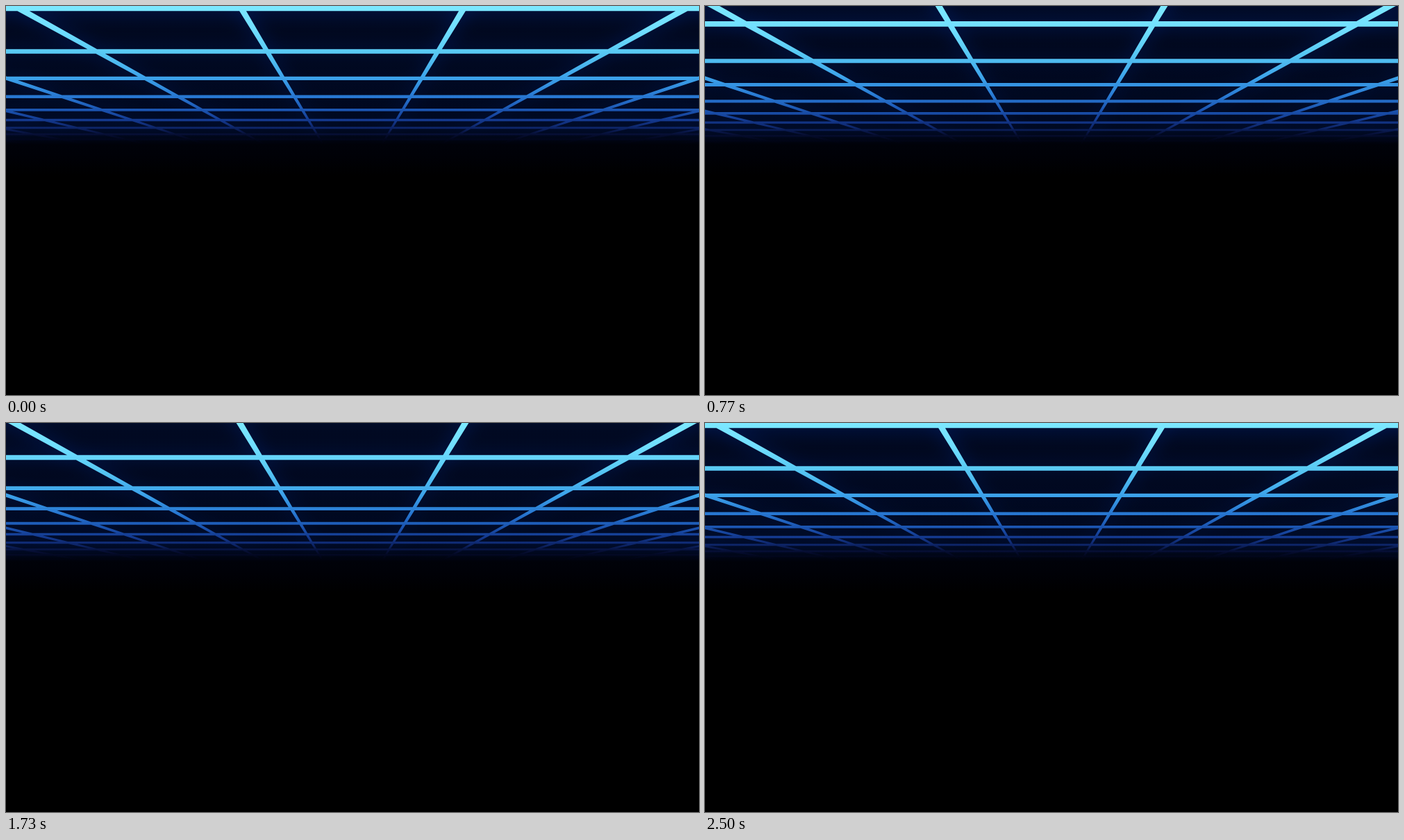
Recreate the animation shown at these times as an HTML page with a canvas. Size 998x561 px, loop 2.53 s.

```html
<!DOCTYPE html>
<html lang="en">
<head>
<meta charset="utf-8">
<title>Neon ceiling grid</title>
<style>
  html, body { margin: 0; width: 100%; height: 100%; overflow: hidden; background: #000; }
  canvas { display: block; }
</style>
</head>
<body>
<canvas id="stage" width="998" height="561"></canvas>
<script>
const ctx = document.getElementById('stage').getContext('2d');
const WIDTH = 998, HEIGHT = 561, CENTER = WIDTH / 2;
const HORIZON = 270;
const LOOP = 2530, STEPS = 75, STEP = 100 / 3;
const SLOPE = 0.6012;       // sideways run of the innermost rail per pixel of height
const THICKNESS = 0.032;    // line weight per pixel of distance from the horizon
const NEAR = 1 / 267, GAP = 0.001146;  // inverse heights of the crossbars

function verticalGradient(stops) {
  const gradient = ctx.createLinearGradient(0, 0, 0, 250);
  for (const [y, color] of stops) gradient.addColorStop(y / 250, color);
  return gradient;
}

const neon = verticalGradient([
  [0, '#7ce8ff'], [35, '#70deff'], [65, '#5acbf4'], [104, '#3ca2ea'],
  [130, '#2878d2'], [150, '#1b54b0'], [164, '#143a90'], [176, '#0d2466'],
  [186, '#080f38b0'], [200, '#00001400']
]);
const haze = verticalGradient([
  [0, '#010a24'], [85, '#010618'], [150, '#00030e'], [215, '#000107'], [245, '#000']
]);

function addRail(path, index) {
  const slope = index * SLOPE, top = -20, reach = HORIZON - top;
  const x = CENTER + slope * reach;
  const half = THICKNESS / 2 * reach * Math.hypot(1, slope);
  path.moveTo(CENTER, HORIZON);
  path.lineTo(x - half, top);
  path.lineTo(x + half, top);
  path.closePath();
}

function addCrossbar(path, depth) {
  const reach = 1 / (NEAR + GAP * depth);
  const weight = THICKNESS * reach;
  path.rect(-50, HORIZON - reach - weight / 2, WIDTH + 100, weight);
}

function draw(time) {
  const step = Math.floor((time % LOOP + 3.4) / STEP);
  const phase = step % STEPS / STEPS;
  const grid = new Path2D();
  for (let i = -15; i <= 15; i += 2) addRail(grid, i);
  for (let n = -1; n < 10; n++) addCrossbar(grid, n + phase);

  ctx.shadowColor = 'transparent';
  ctx.fillStyle = haze;
  ctx.fillRect(0, 0, WIDTH, HEIGHT);
  ctx.shadowColor = 'rgba(0, 50, 170, 0.5)';
  ctx.shadowBlur = 26;
  ctx.fillStyle = neon;
  ctx.fill(grid);
}

const start = performance.now();
function tick() {
  draw(performance.now() - start);
  requestAnimationFrame(tick);
}
tick();
</script>
</body>
</html>
```
